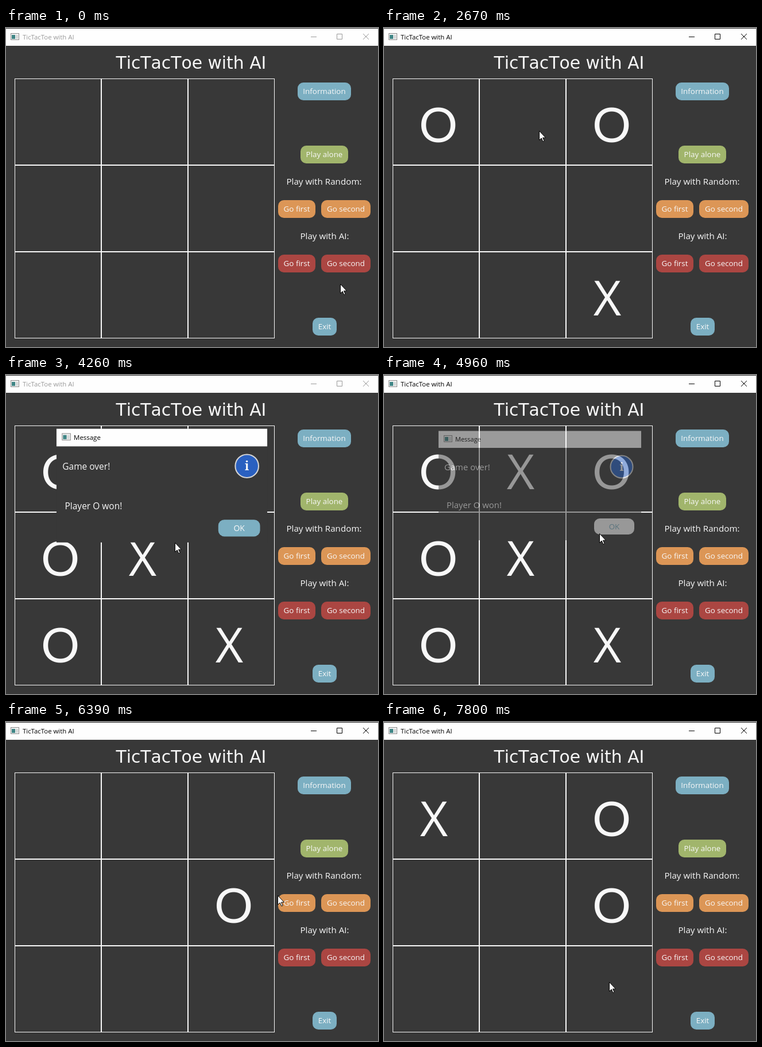
These frames come from a looping animation (648 by 556 pixels, 8 s). An HTML page:

```html
<!DOCTYPE html>
<html lang="en">
<head>
<meta charset="utf-8">
<title>TicTacToe</title>
<style>
  html, body { margin: 0; width: 100%; height: 100%; overflow: hidden; background: #383838; }
  svg { display: block; width: 648px; height: 556px; }
  text { font-family: "Open Sans", "Noto Sans", sans-serif; fill: #f8f8f8; }
  .mid { text-anchor: middle; }
  .head { font: 29.8px "DejaVu Sans", sans-serif; font-kerning: none; }
  .bar { font-size: 11.4px; fill: var(--ink); }
  .label { font-size: 15.2px; }
  .body { font-size: 14.9px; }
  .X { font-size: 84px; }
  .O { font: 84px Lato, sans-serif; }
  .btn rect { fill: var(--c); }
  .btn text { font-size: 13.4px; }
  .btn.hover rect { fill: #f8f8f8; }
  .btn.hover text { fill: var(--c); }
</style>
</head>
<body>
<svg viewBox="0 0 648 556">
  <defs>
    <g id="appIcon">
      <rect x=".5" y=".5" width="14" height="11" fill="#f4f4f4" stroke="#8c8c8c"/>
      <rect x="2" y="3" width="6" height="7" fill="#3f8585"/>
      <rect x="9" y="3" width="4" height="7" fill="#d4d8d8"/>
    </g>
  </defs>
  <rect width="648" height="556" fill="#383838"/>
  <g id="titleBar">
    <rect width="648" height="31" fill="#fefefe"/>
    <rect width="648" height="1" fill="#2b2b2b"/>
    <use href="#appIcon" x="8" y="9"/>
    <text class="bar" x="29" y="20">TicTacToe with AI</text>
    <path d="M531 15.5h10M576.5 10.5h9v9h-9zM622 10l10 10M632 10l-10 10" fill="none" stroke="var(--ink)"/>
  </g>
  <text class="head" x="191.5" y="71">TicTacToe with AI</text>
  <g id="grid" fill="none" stroke="#f8f8f8"></g>
  <g id="marks"></g>
  <text class="mid label" x="554" y="273">Play with Random:</text>
  <text class="mid label" x="555" y="368">Play with AI:</text>
  <g id="buttons"></g>
  <g id="dialog">
    <rect x="95" y="97.5" width="353" height="190.5" fill="#383838"/>
    <rect x="95" y="97.5" width="353" height="29.5" fill="#fefefe"/>
    <use href="#appIcon" x="104" y="105"/>
    <text x="124" y="116" font-size="11" style="fill:#000">Message</text>
    <text class="body" x="105" y="166">Game over!</text>
    <text class="body" x="109" y="232">Player O won!</text>
    <circle cx="414" cy="160" r="19.5" fill="#2a60c0" stroke="#d4d4d4" stroke-width="2"/>
    <text class="mid" x="414" y="167" style="font:bold 20px 'Noto Serif',serif">i</text>
  </g>
  <path id="cursor" d="M.5.5v16l3.7-3.5 2.7 5.9 2.3-1-2.7-5.7h5z" fill="#fff" stroke="#000"/>
</svg>
<script>
const LOOP = 8000, STEP = 120, CELL = 151;
const BLUE = "#7cafc2", GREEN = "#a1b56c", ORANGE = "#dc9656", RED = "#ab4642";

const $ = id => document.getElementById(id);
const within = (v, from, to) => v >= from && v < to;

function add(parent, tag, attrs, text) {
  const el = document.createElementNS("http://www.w3.org/2000/svg", tag);
  for (const k in attrs) el.setAttribute(k, attrs[k]);
  if (text) el.textContent = text;
  return parent.appendChild(el);
}

function button(parent, label, color, x, y, w, h = 31) {
  const el = add(parent, "g", { class: "btn", style: `--c:${color}` });
  add(el, "rect", { x, y, width: w, height: h, rx: 10 });
  add(el, "text", { class: "mid", x: x + w / 2, y: y + h / 2 + 4.7 }, label);
  return { el, x, y, w, h };
}

const panel = $("buttons");
button(panel, "Information", BLUE, 508, 95, 93);
button(panel, "Play alone", GREEN, 513, 205, 83);
button(panel, "Exit", BLUE, 534, 505, 42);
const targets = [button($("dialog"), "OK", BLUE, 366, 250, 70, 28)];
[ORANGE, RED].forEach((color, i) => {
  const y = 300 + 95 * i;
  button(panel, "Go first", color, 474, y, 65);
  targets.push(button(panel, "Go second", color, 549, y, 86));
});

const cells = Array.from({ length: 9 }, (_, i) => {
  const x = i % 3 * CELL, y = Math.floor(i / 3) * CELL;
  add($("grid"), "rect", { x: x + 15.5, y: y + 88.5, width: CELL - 1, height: CELL - 1 });
  return { x, el: add($("marks"), "text", { y: y + 199 }) };
});

// Cells played at each time; O opens a game and the marks alternate.
const games = [
  { 1280: "0", 2040: "82", 2950: "16", 3900: "43" },
  { 6270: "5", 7170: "02" }
];

// Pointer moves: start, number of even steps, end point.
const moves = [
  [270, 4, 574, 407], [1530, 1, 511, 417], [1650, 1, 415, 415], [1800, 6, 293, 383],
  [2550, 2, 270, 179], [3230, 3, 258, 279], [3620, 1, 253, 300], [4260, 3, 375, 276],
  [5230, 3, 553, 298], [5620, 2, 581, 311], [6390, 3, 257, 285], [6780, 3, 139, 189],
  [7290, 1, 150, 200], [7440, 4, 392, 453]
];

function pointerAt(t) {
  let point = [582, 446];
  for (const [start, steps, ...end] of moves) {
    if (t < start) break;
    const k = Math.min(1, (Math.floor((t - start) / STEP) + 1) / steps);
    point = point.map((v, i) => Math.round(v + (end[i] - v) * k));
  }
  return point;
}

function boardAt(t) {
  const game = games.findLast(g => Object.keys(g)[0] <= t) || {};
  const played = Object.keys(game).filter(k => k <= t).map(k => game[k]).join("");
  return cells.map((_, i) => {
    const turn = played.indexOf(i);
    return turn < 0 ? "" : "OX"[turn % 2];
  });
}

function dialogAt(t) {
  if (!within(t, 3900, 5090)) return 0;
  return within(t, 4020, 4960) ? 1 : 0.5;
}

function draw(t) {
  const [px, py] = pointerAt(t);
  $("cursor").setAttribute("transform", `translate(${px} ${py})`);
  for (const { el, x, y, w, h } of targets)
    el.classList.toggle("hover", within(px, x, x + w) && within(py, y, y + h));

  const active = t >= 1130 && !within(t, 3770, 4960);
  $("titleBar").style.setProperty("--ink", active ? "#000" : "#999");

  boardAt(t).forEach((mark, i) => {
    const { x, el } = cells[i];
    el.textContent = mark;
    el.setAttribute("class", "mid " + mark);
    el.setAttribute("x", x + (mark === "X" ? 87 : 94.5));
  });

  const alpha = dialogAt(t);
  const scale = alpha === 1 ? 1.04 : 1;
  $("dialog").setAttribute("opacity", alpha);
  $("dialog").setAttribute("transform", `translate(271.5 192.5) scale(${scale}) translate(-271.5 -192.5)`);
}

const began = performance.now();
function tick() {
  draw((performance.now() - began) % LOOP);
  requestAnimationFrame(tick);
}
tick();
</script>
</body>
</html>
```
